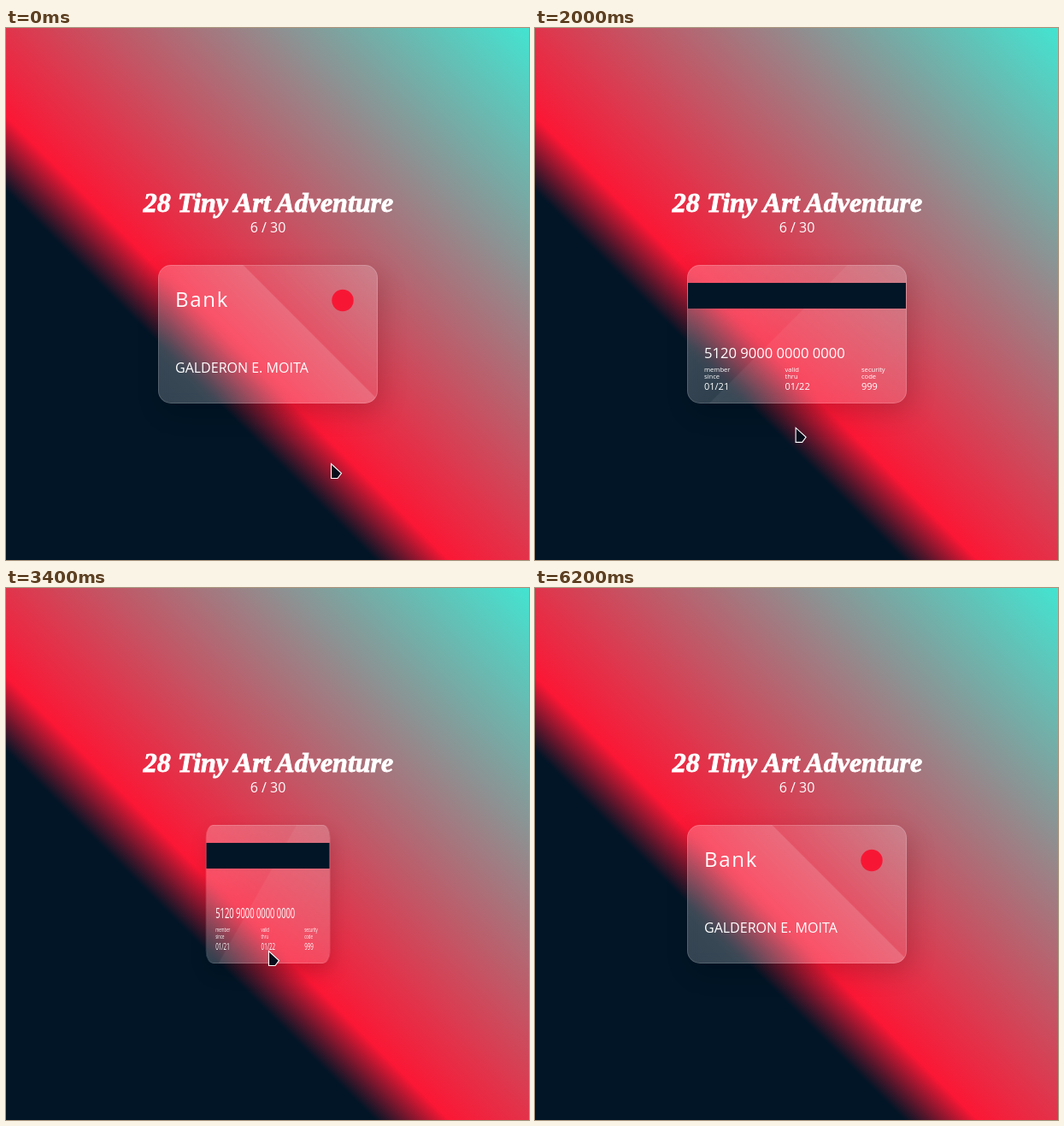
These frames come from a looping animation (612x622 px, 7.94 s). An HTML page:

```html
<!DOCTYPE html>
<html lang="en">
<head>
<meta charset="utf-8">
<title>Glass bank card</title>
<style>
  html, body { margin: 0; width: 100%; height: 100%; overflow: hidden; }
  body {
    position: relative;
    background: linear-gradient(45deg, #011526 35%, #fb1735 42%, #43e4d1 100%);
  }
  #card {
    position: absolute; left: 178px; top: 277px; width: 257px; height: 162px;
    box-sizing: border-box; border-radius: 15px;
    border: 1px solid rgba(255, 255, 255, .16);
    background: linear-gradient(45deg,
      rgba(255, 255, 255, .2), rgba(255, 255, 255, .28) 62.2%,
      rgba(255, 255, 255, .15) 62.6%, rgba(255, 255, 255, .22)) border-box;
    box-shadow: 5px 10px 30px rgba(0, 0, 0, .17);
    -webkit-backdrop-filter: blur(7px);
    backdrop-filter: blur(7px);
  }
  #card.flipped {
    background: linear-gradient(135deg,
      rgba(255, 255, 255, .26), rgba(255, 255, 255, .19) 44.6%,
      rgba(255, 255, 255, .23) 45%, rgba(255, 255, 255, .18)) border-box;
  }
  svg { position: absolute; left: 0; top: 0; }
  text { fill: #fff; font-family: "Open Sans", "Noto Sans", sans-serif; }
  .title {
    font: italic bold 32px "Liberation Serif", "Noto Serif", serif;
    stroke: #fff; stroke-width: .9px; text-anchor: middle;
  }
  .label { font-size: 7.6px; }
  .date { font-size: 11px; }
</style>
</head>
<body>
<div id="card"></div>
<svg width="612" height="622" viewBox="0 0 612 622">
  <text class="title" x="307" y="215">28 Tiny Art Adventure</text>
  <text x="306.5" y="239" font-size="16" text-anchor="middle">6 / 30</text>
  <g id="front">
    <text x="198" y="326" font-size="24" letter-spacing="1.7">Bank</text>
    <circle cx="394" cy="318.5" r="12.7" fill="#f71735"/>
    <text x="198" y="403" font-size="16">GALDERON E. MOITA</text>
  </g>
  <g id="back">
    <text x="198" y="386" font-size="16.6">5120 9000 0000 0000</text>
  </g>
  <rect id="strip" x="179" y="298" width="255" height="30" fill="#011526"/>
  <path id="cursor" d="M.5 .5V17.5H8L12.5 11.5Z" fill="#080e1b" stroke="#fff" stroke-width="1.1"/>
</svg>
<script>
const LOOP = 7940, FLIP = 500, FADE = 150, MID = 306.5;
// Hover spans of the pointer: [enter, leave]
const HOVERS = [[780, 2130], [3198, 4487]];
// Pointer path: [time, x, y]
const PATH = [
  [70, 380, 509], [780, 336, 478], [1000, 306, 436], [1130, 303, 431],
  [1330, 290, 428], [1669, 290, 428], [1670, 304, 465], [1990, 304, 465],
  [2130, 312, 489], [2270, 316, 543], [2480, 316, 569], [2730, 314, 572],
  [2930, 314, 572], [3198, 309, 486], [3400, 307, 424], [3670, 306, 421],
  [4390, 306, 421], [4487, 313, 476], [4530, 316, 492], [4730, 322, 560],
  [5000, 341, 533], [5130, 346, 538], [5200, 352, 536], [5870, 563, 310],
  [6000, 563, 310], [6200, 614, 260]
];
const byId = id => document.getElementById(id);
const [card, front, back, strip, cursor] = ["card", "front", "back", "strip", "cursor"].map(byId);
const clamp = v => Math.min(1, Math.max(0, v));

[[198, "member", "since", "01/21"], [292.5, "valid", "thru", "01/22"], [382, "security", "code", "999"]]
  .forEach(([x, ...lines]) => lines.forEach((line, i) => {
    const el = document.createElementNS(back.namespaceURI, "text");
    el.setAttribute("x", x);
    el.setAttribute("y", [402, 410, 423][i]);
    el.setAttribute("class", i < 2 ? "label" : "date");
    el.textContent = line;
    back.append(el);
  }));

// cubic-bezier(.25, .1, .25, 1)
function ease(x) {
  if (x <= 0) return 0;
  if (x >= 1) return 1;
  const curve = (s, a, b) => 3 * s * (1 - s) ** 2 * a + 3 * s * s * (1 - s) * b + s ** 3;
  let lo = 0, hi = 1;
  for (let i = 0; i < 24; i++) {
    const mid = (lo + hi) / 2;
    if (curve(mid, .25, .25) < x) lo = mid; else hi = mid;
  }
  return curve(lo, .1, 1);
}

function pointerAt(t) {
  const next = PATH.findIndex(p => p[0] > t);
  if (next < 0) return PATH[PATH.length - 1].slice(1);
  if (next === 0) return PATH[0].slice(1);
  const [t0, x0, y0] = PATH[next - 1], [t1, x1, y1] = PATH[next];
  const k = (t - t0) / (t1 - t0);
  return [x0 + (x1 - x0) * k, y0 + (y1 - y0) * k];
}

function turn(el, scale) {
  el.setAttribute("transform", `translate(${MID} 0) scale(${scale} 1) translate(${-MID} 0)`);
}

function draw(t) {
  let flip = 0, dark = 0, hovered = false;
  for (const [enter, leave] of HOVERS) {
    flip += ease((t - enter) / FLIP) - ease((t - leave) / FLIP);
    dark += clamp((t - enter) / FADE) - clamp((t - leave) / FADE);
    hovered = hovered || (t >= enter && t < leave);
  }
  const c = Math.cos(Math.PI * flip), width = Math.max(Math.abs(c), .001);
  card.style.transform = `scaleX(${width})`;
  card.classList.toggle("flipped", c < 0);
  turn(front, c);
  turn(back, -c);
  turn(strip, width);
  front.style.display = hovered ? "none" : "";
  back.style.display = hovered ? "" : "none";
  strip.style.opacity = dark;
  cursor.setAttribute("transform", `translate(${pointerAt(t)})`);
}

const start = performance.now();
function tick() {
  draw((performance.now() - start) % LOOP);
  requestAnimationFrame(tick);
}
tick();
</script>
</body>
</html>
```
